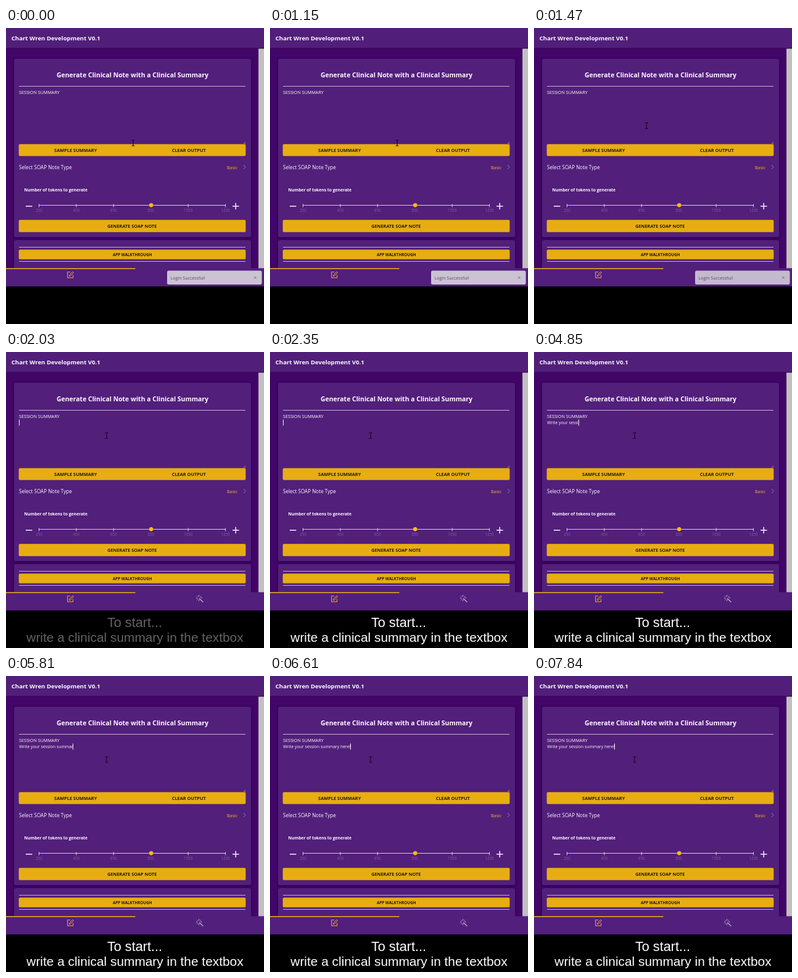
Recreate the animation shown at these times as an HTML page. Size 418 px wide and 480 px high, loop 8 s.

```html
<!DOCTYPE html>
<html lang="en">
<head>
<meta charset="utf-8">
<title>Clinical note form</title>
<style>
  html, body { margin: 0; width: 100%; height: 100%; overflow: hidden; background: #000; }
  svg { display: block; width: 418px; height: 480px; }
  text { font-family: "Open Sans", "Noto Sans", sans-serif; font-weight: 500; fill: #fcf8ff; white-space: pre; }
  .b { font-weight: 700; }
  .m { text-anchor: middle; }
  .btn { fill: #e7ad12; stroke: #efb614; stroke-width: .6; }
  .btn + text, .dark { fill: #2b1a14; font-weight: 700; text-anchor: middle; }
  .rule { stroke: #c4b2d2; stroke-width: 1; }
  .card { fill: #521f7b; filter: drop-shadow(0 1px 2px #2a0148); }
  .icon { fill: none; stroke-linecap: round; stroke-linejoin: round; }
  .tick { fill: #81609c; font-size: 6.2px; text-anchor: middle; }
  #caption text { font-family: "Liberation Sans", Arial, sans-serif; font-weight: 400; fill: #fff; text-anchor: middle; }
</style>
</head>
<body>
<svg viewBox="0 0 418 480">
  <!-- page -->
  <rect width="418" height="480"/>
  <rect width="418" height="419" fill="#420668"/>
  <rect x="409" y="33" width="9" height="357" fill="#c1c0c2"/>
  <rect y="32" width="418" height="1.5" fill="#380558"/>
  <rect width="418" height="32.3" fill="#511f7a"/>
  <text class="b" x="8.7" y="20" font-size="9.65">Chart Wren Development V0.1</text>

  <!-- form card -->
  <rect class="card" x="13" y="50" width="384" height="289" rx="3"/>
  <text class="b m" x="205" y="80" font-size="10.45">Generate Clinical Note with a Clinical Summary</text>
  <path class="rule" d="M21 94.5H388"/>
  <text x="21" y="106.8" font-size="7.2">SESSION SUMMARY</text>
  <path d="M384.5 188l3.5-3.5M386.5 188l1.5-1.5" stroke="#b9a7c8" stroke-width=".7"/>
  <rect class="btn" x="21" y="188.7" width="367" height="18.6" rx="1.5"/>
  <text x="112.7" y="201" font-size="7.4">SAMPLE SUMMARY</text>
  <text class="dark" x="296.3" y="201" font-size="7.4">CLEAR OUTPUT</text>

  <text x="21" y="229" font-size="8.15">Select SOAP Note Type</text>
  <text x="358" y="228.5" font-size="7.05" style="fill:#f0b71c">Basic</text>
  <path class="icon" d="M385 222.3l3.2 3.2-3.2 3.2" stroke="#9478ae" stroke-width="1"/>

  <text class="b" x="29.5" y="265" font-size="6.8">Number of tokens to generate</text>
  <path d="M32 289H42.5M367 289H377.5M372.2 283.8V294.2" stroke="#f4eef8" stroke-width="1.5"/>
  <g id="scale"></g>
  <path d="M235 287.5H356" stroke="#dccfe4"/>
  <path d="M53 287.5H235" stroke="#ecc987"/>
  <circle cx="235.2" cy="287.3" r="3.2" fill="#fbbd12"/>
  <rect class="btn" x="21" y="311.5" width="367" height="19.2" rx="1.5"/>
  <text x="204.3" y="324.2" font-size="7.33">GENERATE SOAP NOTE</text>

  <!-- walkthrough card -->
  <path class="card" d="M13 390V347a3 3 0 0 1 3-3H394a3 3 0 0 1 3 3V390z"/>
  <path class="rule" d="M21 355.5H388M21 378.5H388"/>
  <rect class="btn" x="21" y="359.8" width="367" height="15" rx="1.5"/>
  <text x="204.8" y="370" font-size="6.32">APP WALKTHROUGH</text>

  <!-- tab bar -->
  <rect y="389.5" width="418" height="29.5" fill="#521f7c"/>
  <rect y="389.5" width="209.5" height="1.5" fill="#e9b01a"/>
  <path class="icon" d="M103.5 395.7H99.7V405H108.7V401M102.6 402.2l.4-2 5-5 1.6 1.6-5 5z" stroke="#f0b41c"/>
  <g class="icon" stroke="#b9a6c8">
    <path d="M313.5 400L319 405.3" stroke-width="1.5"/>
    <path d="M312.6 394.3v2M312.6 401.6v2M308.3 399h2M315.3 398.6h2M309.5 395.8l1.2 1.2M315.8 395.8l-1.2 1.2M309.5 402.2l1.2-1.2"/>
  </g>

  <!-- overlays -->
  <g id="toast">
    <rect x="261" y="393.5" width="153.5" height="22.5" rx="2.5" fill="#cbc2d2"/>
    <text x="266.5" y="407.7" font-size="7.1" style="fill:#55505c">Login Successful!</text>
    <path d="M402.2 403.2l3.2 3.2M405.4 403.2l-3.2 3.2" stroke="#5d5865" stroke-width=".8"/>
  </g>
  <text id="typed" x="21.3" y="117.4" font-size="6.85"></text>
  <path id="caret" d="M.5 109.5V119.5" stroke="#f4eefa" stroke-width="1"/>
  <path id="pointer" d="M-2.5 -4.5H-.8L0 -4 .8 -4.5H2.5M0 -4V4M-2.5 4.5H-.8L0 4 .8 4.5H2.5" fill="none" stroke="#190527" stroke-width="1.1"/>
  <g id="caption">
    <text x="208.5" y="446" font-size="21.7">To start...</text>
    <text x="209" y="470" font-size="20.87">write a clinical summary in the textbox</text>
  </g>
</svg>
<script>
  const LOOP = 8000, BLINK = 540, CLICK = 1960;
  const MESSAGE = "Write your session summary here!";
  // [time, characters typed]
  const KEYS = [[3320, 1], [4850, 16], [5810, 25], [6530, 32]];
  const $ = id => document.getElementById(id);
  const [scale, toast, typed, caret, pointer, caption] =
    ["scale", "toast", "typed", "caret", "pointer", "caption"].map($);

  const ramp = (t, from, to) => Math.min(1, Math.max(0, (t - from) / (to - from)));
  const smooth = p => p * p * (3 - 2 * p);

  for (let i = 0; i < 6; i++) {
    const x = 53.5 + i * 60.4;
    scale.innerHTML += `<path d="M${x} 285.5V290.5" stroke="#dccfe4"/>
      <text class="tick" x="${x}" y="298.2">${250 + i * 200}</text>`;
  }

  function typedCount(t) {
    if (t < KEYS[0][0]) return 0;
    for (let i = 1; i < KEYS.length; i++) {
      const [t0, n0] = KEYS[i - 1], [t1, n1] = KEYS[i];
      if (t < t1) return Math.floor(n0 + (n1 - n0) * ramp(t, t0, t1));
    }
    return MESSAGE.length;
  }

  function caretShown(t) {
    if (t < CLICK) return false;
    const [first, last] = [KEYS[0][0], KEYS[KEYS.length - 1][0]];
    if (t >= first && t < last) return true;
    return Math.floor((t - (t < first ? CLICK : last)) / BLINK) % 2 === 0;
  }

  function draw(t) {
    const move = smooth(ramp(t, 1150, 1750));
    pointer.setAttribute("transform", `translate(${206 - 43 * move} ${186.5 - 51 * move})`);
    toast.setAttribute("opacity", 1 - ramp(t, 1450, 1850));
    caption.setAttribute("opacity", ramp(t, 1830, 2350));

    const text = MESSAGE.slice(0, typedCount(t));
    typed.textContent = text;
    const x = 21 + (text ? typed.getComputedTextLength() : 0);
    caret.setAttribute("transform", `translate(${Math.round(x)} 0)`);
    caret.setAttribute("opacity", caretShown(t) ? 1 : 0);
  }

  const start = performance.now();
  (function frame() {
    draw((performance.now() - start) % LOOP);
    requestAnimationFrame(frame);
  })();
</script>
</body>
</html>
```
